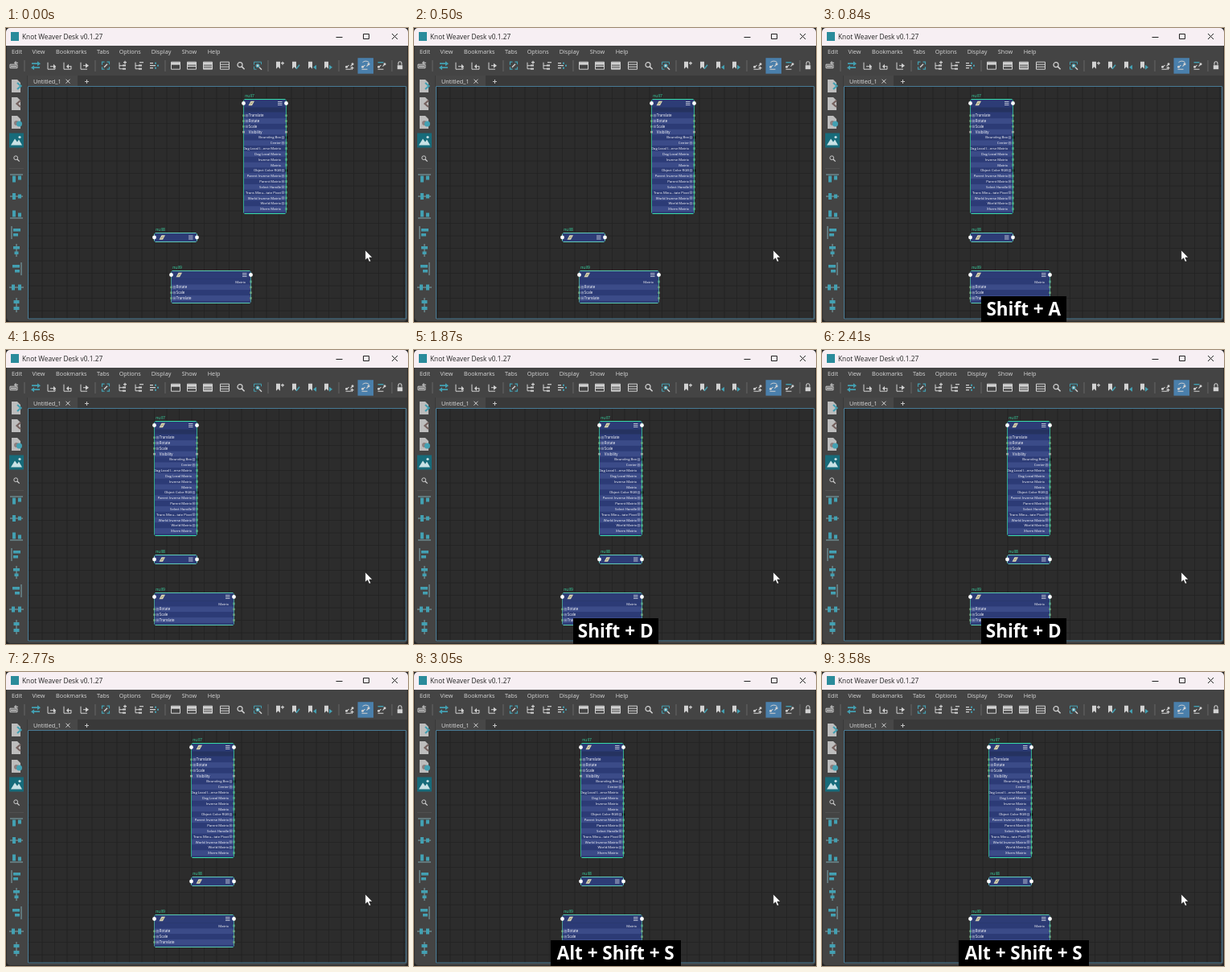
An HTML page for the animation above (3930 ms loop, 500 by 365 pixels).

```html
<!DOCTYPE html>
<html lang="en">
<head>
<meta charset="utf-8">
<title>Node layout</title>
<style>
html, body { margin: 0; width: 100%; height: 100%; overflow: hidden; background: #222; }
svg { display: block; width: 500px; height: 365px; font-family: "Open Sans", "Noto Sans", sans-serif; }
</style>
</head>
<body>
<svg id="stage" viewBox="0 0 500 365" xmlns="http://www.w3.org/2000/svg"></svg>
<script>
const stage = document.getElementById('stage');
const LIGHT = '#d2d2d2', TEAL = '#43a0b2', GREEN = '#38dba6';

const rect = (x, y, w, h, fill, more = '') =>
  `<rect x="${x}" y="${y}" width="${w}" height="${h}" fill="${fill}" ${more}/>`;
const dot = (x, y, r, fill, more = '') => `<circle cx="${x}" cy="${y}" r="${r}" fill="${fill}" ${more}/>`;
const line = (d, color = LIGHT, w = 1) => `<path d="${d}" fill="none" stroke="${color}" stroke-width="${w}"/>`;
const shape = (d, fill = LIGHT) => `<path d="${d}" fill="${fill}"/>`;
const text = (x, y, size, fill, s, more = '') =>
  `<text x="${x}" y="${y}" font-size="${size}" fill="${fill}" ${more}>${s}</text>`;
const at = (x, y, body) => `<g transform="translate(${x} ${y})">${body}</g>`;

// Icons are drawn around their centre.
const frame = (x, y, w, h, c = LIGHT, sw = 1) => line(`M${x} ${y}h${w}v${h}h${-w}z`, c, sw);
const lens = (s = 1) => dot(-1 * s, -1 * s, 3 * s, 'none', `stroke="${LIGHT}" stroke-width="${1.2 * s}"`)
  + line(`M${1.2 * s} ${1.2 * s}l${3.4 * s} ${3.4 * s}`, LIGHT, 1.5 * s);
const tray = mark => line('M-5 -4v8.5h9v-4') + mark;
const tree = mark => line('M-4 -4v8h4M-4 0h4') + rect(0, -1.2, 4, 2, LIGHT) + rect(0, 3, 4, 2, LIGHT) + mark;
const list = n => frame(-5.5, -4.5, 11, 9) + rect(-5, -4, 10, 3, LIGHT)
  + (n > 1 ? rect(-5, 0, 10, 1.5, LIGHT) : '') + (n > 2 ? rect(-5, 2.5, 10, 1.5, LIGHT) : '');
const flag = mark => shape('M-4 -5h5v9l-2.5 -2.5l-2.5 2.5z') + mark;
const plus = (x, y, c = TEAL) => line(`M${x - 2} ${y}h4M${x} ${y - 2}v4`, c, 1.2);
const links = mark => line('M-4 2l3 -2.5M1 1l3 -3M-5 4.5h7', LIGHT, 1.1) + dot(-4, 1.5, 1.5, LIGHT) + dot(3.5, -2, 1.5, LIGHT) + mark;

const tools = [
  [10, frame(-5, -1.5, 9, 4.5) + rect(-4, 0, 7, 1.6, LIGHT) + line('M2 -5.5v4M0 -3.5h5')],
  [37, line('M-5 -2.5h9M5 2.5h-9', TEAL, 1.7) + shape('M2 -5.5l4 3l-4 3zM-2 -.5l-4 3l4 3z', TEAL)],
  [57, tray(line('M-2 1h5') + shape('M2 -2l3 3l-3 3z'))],
  [77, tray(line('M0 1h4') + shape('M1 -2l-3 3l3 3z'))],
  [98, line('M-5 -4v8.5h8M-2 0h4') + shape('M1 -3l4 3l-4 3z')],
  [124, line('M-4.5 -1v-3.5h3M1.5 -4.5h3v3M4.5 1.5v3h-3M-1.5 4.5h-3v-3', TEAL, 1.2) + line('M-2 2L2 -2', LIGHT, 1.4)],
  [145, tree(plus(3, -4, LIGHT))],
  [165, tree(line('M1 -4h5', LIGHT, 1.2))],
  [185, line('M-6 -3h4M-6 0h7M-6 3h4', LIGHT, 1.3) + rect(0, -4, 2, 2, TEAL) + rect(3, -1, 2, 2, TEAL) + rect(0, 2, 2, 2, TEAL)],
  [211, list(1)], [231, list(2)], [251, list(3)],
  [272, frame(-5.5, -4.5, 11, 9) + line('M-5 -1.5h10M-5 1.5h10')],
  [292, lens()],
  [313, line('M-4.5 -1v-3.5h9v3M-4.5 1v3.5h3', TEAL) + dot(0, 0, 2.5, TEAL) + dot(0, 0, 1.3, LIGHT) + line('M2 2l3 3', LIGHT, 1.4)],
  [340, flag(plus(4, -3, LIGHT))],
  [360, flag(line('M1 4l4 -5', TEAL, 1.6))],
  [380, flag(shape('M6 -1l-4 3l4 3z', TEAL))],
  [400, flag(shape('M2 -1l4 3l-4 3z', TEAL))],
  [427.5, links(plus(3, 3, LIGHT))],
  [447.5, rect(-10, -9.5, 19.5, 19.5, '#4a7fab') + links(line('M-4 -4a5 4 0 0 1 8 0', LIGHT))],
  [467.5, links(line('M-5 -4h7', TEAL, 1.4))],
  [490, rect(-3.2, -.5, 6.4, 5, LIGHT) + line('M-2 -1v-2a2 2 0 0 1 4 0v2', LIGHT, 1.1)]
];

const page = mark => shape('M-6 -8h7l4 4v12h-11z', '#bdbdbd') + mark;
const bars = (a, b, axis) => line(axis, '#7fa9b0') + rect(...a, TEAL) + rect(...b, TEAL);
const sides = [
  [72, page(line('M1 -4l4.5 4l-4.5 4', TEAL, 2.2))],
  [94, page(line('M5 -4l-4.5 4l4.5 4', '#75625f', 2.2))],
  [117, page(dot(0, 1, 3, '#8b7f7f') + dot(3.5, 2, 3.5, TEAL))],
  [139.5, rect(-9, -9, 18, 18, '#176b7a') + shape('M-7 6l5 -8l3 4l2 -3l4 7z', '#c9e2e6') + dot(4, -4, 1.6, '#c9e2e6')],
  [162, lens(.8)],
  [187, bars([-5, -3.5, 4, 8], [2, -3.5, 4, 5], 'M-8 -5h16')],
  [209, bars([-5, -4, 4, 8], [2, -2.5, 4, 5], 'M-8 0h16')],
  [231, bars([-5, -4.5, 4, 8], [2, -1.5, 4, 5], 'M-8 5h16')],
  [254, bars([-4, -5, 9, 3.5], [-4, 1, 6, 3.5], 'M-6 -8v16')],
  [276, bars([-4, -5, 8, 3.5], [-2.5, 1.5, 5, 3.5], 'M0 -8v16')],
  [299, bars([-5, -5, 9, 3.5], [-2, 1, 6, 3.5], 'M6 -8v16')],
  [322, bars([-6, -3.5, 4, 7], [2, -3.5, 4, 7], 'M-9 0h18')],
  [344, bars([-3.5, -6, 7, 4], [-3.5, 2, 7, 4], 'M0 -9v18')]
];

function chrome() {
  let s = rect(0.5, 0, 499, 364.5, '#444', 'rx="5" stroke="#2c2c2c"');
  s += shape('M0 22V5a5 5 0 0 1 5 -5h490a5 5 0 0 1 5 5v17z', '#f7eff3');
  s += rect(6, 5, 10, 11, '#2a8b9b');
  s += text(20, 14, 8.3, '#222', 'Knot Weaver Desk v0.1.27');
  s += line('M410.5 11.5h8M444.5 7.5h7v6h-7zM480 7l7 7M487 7l-7 7', '#222');
  [[7, 'Edit'], [32.6, 'View'], [62, 'Bookmarks'], [113, 'Tabs'], [140.7, 'Options'],
   [180.7, 'Display'], [218.7, 'Show'], [250.7, 'Help']]
    .forEach(([x, name]) => { s += text(x, 32.2, 7.3, '#d8d8d8', name); });
  [23, 111, 198, 326, 414, 480].forEach(x => { s += line(`M${x} 40v14`, '#707070', .8); });
  tools.forEach(([x, icon]) => { s += at(x, 46.7, icon); });
  s += rect(26, 59, 473, 14, '#393939') + rect(27, 59, 62, 14, '#474747');
  s += text(34, 69, 7.3, '#ddd', 'Untitled_1') + line('M74.5 63.7l5 5M79.5 63.7l-5 5', '#d0d0d0');
  s += line('M98 66.5h5M100.5 64v5', '#d0d0d0', .9);
  s += line('M4 174.5h18', '#555', .7);
  sides.forEach(([y, icon]) => { s += at(13, y, icon); });
  s += rect(27, 73, 470.5, 288.5, '#2c2c2c');
  const step = 15.5;
  let grid = '';
  for (let x = 29.5; x < 497; x += step) grid += `M${x} 73v288`;
  for (let y = 87.5; y < 361; y += step) grid += `M27 ${y}h470`;
  return s + line(grid, '#222', .8) + frame(27.5, 72.5, 470, 288.5, '#487a94');
}

// A leading "+" marks an expandable row.
const inputs = ['+Translate', '+Rotate', '+Scale', 'Visibility'];
const outputs = ['+Bounding Box', '+Center', 'Dag Local I...erse Matrix', 'Dag Local Matrix',
  'Inverse Matrix', 'Matrix', '+Object Color RGB', '+Parent Inverse Matrix', '+Parent Matrix',
  '+Select Handle', '+Trans Minu...tate Pivot', '+World Inverse Matrix', '+World Matrix', 'Xform Matrix'];
const PITCH = 6.82;

const knob = (x, y) => frame(x - 1.3, y - 1.3, 2.6, 2.6, '#b4bdd8', .5) + line(`M${x - .8} ${y}h1.6`, '#e4e7f2', .5);

function row(name, y, w, side, i) {
  const open = name[0] === '+', label = name.replace('+', '');
  let s = rect(.5, y - PITCH / 2, w - 1, PITCH, i % 2 ? '#3b4b88' : '#2c3b76');
  if (side === 'in') {
    const port = label === 'Visibility' ? '#d9b7b7' : '#7a9a70';
    s += text(6.3, y + 1.5, 4.4, '#fff', label);
    if (open) s += knob(4, y);
    s += rect(-1.2, y - 1.3, 2.4, 2.6, port) + rect(w - 1.2, y - 1.3, 2.4, 2.6, port);
  } else {
    const dark = /^(Bound|Object)/.test(label);
    s += text(w - 6.4, y + 1.5, 4.25, '#fff', label, 'text-anchor="end"');
    if (open) s += knob(w - 4, y);
    s += rect(w - 1.2, y - 1.5, dark ? 3 : 2.4, 3, dark ? '#0c0c0c' : '#5c9a7d');
  }
  return s;
}

function node(id, y, w, h, rows, first, edge) {
  const mid = y + (h < 20 ? 5.5 : 5);
  let s = rect(0, y, w, h, '#2d3c76', 'rx="1.5"');
  if (h > 20) s += rect(1, y + 10, w - 2, 6, '#253260');
  const body = rows.map(([name, side], i) => row(name, first + i * PITCH, w, side, i)).join('');
  s += `<g>${body}</g>` + line(`M1 ${y}h${w - 2}M1 ${y + h}h${w - 2}`, edge);
  s += line(`M0 ${y + 1}v${h - 2}M${w} ${y + 1}v${h - 2}`, edge, rows.length ? .7 : 1);
  s += shape(`M6 ${mid + 2.7}l3 -5.4h4.5l-3 5.4z`, '#d8d4b4') + line(`M8.3 ${mid + 1}l3 -2`, '#70684a', .7);
  s += line([-2, 0, 2].map(d => `M${w - 10.5} ${mid + d}h5.5`).join(''), '#c3c8d9', .9);
  s += dot(0, mid, 2.4, '#fff') + dot(w, mid, 2.4, '#fff');
  return `<g id="${id}">${text(1.8, y - 2.4, 5, GREEN, id)}${s}</g>`;
}

const tag = (names, side) => names.map(n => [n, side]);

stage.innerHTML = chrome()
  + node('null7', 88.5, 53, 142, [...tag(inputs, 'in'), ...tag(outputs, 'out')], 108.7, GREEN)
  + node('null8', 254.5, 53, 11, [], 0, '#5fcbb9')
  + node('null9', 301.5, 99, 40,
      [['Matrix', 'out'], ...tag(['+Rotate', '+Scale', '+Translate'], 'in')], 315, '#58c9b0')
  + `<path d="M446.8 275.8v12.4l2.9 -2.5l2 4.6l2.1 -.9l-2 -4.4h4z" fill="#fff" stroke="#111" stroke-width=".6"/>`
  + `<g id="keys">${rect(0, 333, 0, 32, '#000')}${text(250.7, 357, 22.5, '#fff', '', 'font-weight="700" text-anchor="middle"')}</g>`;

const nodes = ['null7', 'null8', 'null9'].map(id => document.getElementById(id));
const keys = document.getElementById('keys');
const [plate, caption] = keys.children;

const LOOP = 3930;
const loose = [295.5, 184.5, 205.5], left = [184.5, 184.5, 184.5],
  right = [230.5, 230.5, 184.5], centre = [207.5, 207.5, 184.5];
// start time, node positions, shortcut, plate left edge, plate width
const steps = [
  [0, loose, ''],
  [840, left, 'Shift + A', 198, 106],
  [1660, left, ''],
  [1870, right, 'Shift + D', 198, 106],
  [2770, right, ''],
  [3050, centre, 'Alt + Shift + S', 170, 162]
];

let shown = null;
function draw(time) {
  const t = time % LOOP;
  const now = steps.filter(s => s[0] <= t).pop();
  if (now === shown) return;
  shown = now;
  const [, xs, label, x = 0, w = 0] = now;
  nodes.forEach((n, i) => n.setAttribute('transform', `translate(${xs[i]} 0)`));
  keys.style.display = label ? '' : 'none';
  plate.setAttribute('x', x);
  plate.setAttribute('width', w);
  caption.textContent = label;
}

const start = performance.now();
function tick() {
  draw(Math.max(0, performance.now() - start));
  requestAnimationFrame(tick);
}
tick();
</script>
</body>
</html>
```
